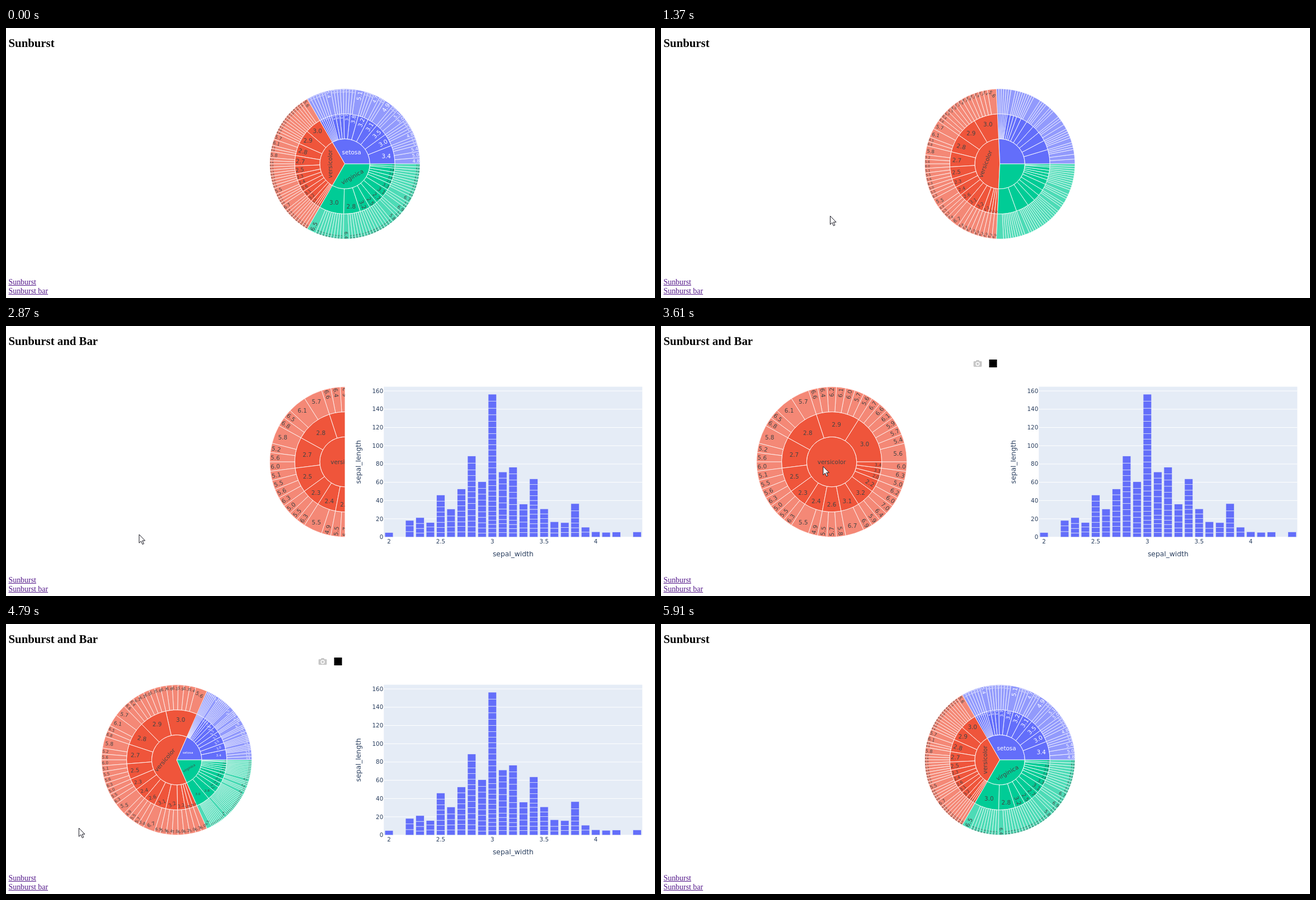
These frames come from a looping animation (1160 px wide and 483 px high, 6700 ms). An HTML page with a canvas:

```html
<!DOCTYPE html>
<html lang="en">
<head>
<meta charset="utf-8">
<title>Sunburst</title>
<style>
  html, body { margin: 0; width: 100%; height: 100%; overflow: hidden; background: #fff; }
  h2, a { position: absolute; left: 4.5px; margin: 0; white-space: nowrap; font-family: "Liberation Serif", serif; }
  h2 { top: 15px; font-size: 20.8px; line-height: 24px; color: #000; }
  a { font-size: 13.9px; line-height: 16px; color: #551a8b; text-decoration: underline; }
  canvas { position: absolute; left: 0; top: 0; width: 1160px; height: 483px; }
</style>
</head>
<body>
<h2 id="heading">Sunburst</h2>
<a style="top:447px">Sunburst</a>
<a style="top:463px">Sunburst bar</a>
<canvas id="stage"></canvas>
<script>
const LOOP = 6700;
const ZOOM_IN = 1192, ZOOM_OUT = 4358, ZOOM_TIME = 785;
const PAGE_IN = 2520, RELAYOUT = 2950, BAR_HIDE = 5280, PAGE_OUT = 5700;
const R = 134.3, CY = 243.1, LINE = 0.87;
const FONT = '"DejaVu Sans", Verdana, sans-serif';
const LABEL_SIZE = 10.4, LABEL_HEIGHT = 12.6, PAD = 2.6;
const RAD = Math.PI / 180;

// Iris measurements: each group is a sepal width followed by its sepal lengths (*n = repeated).
const species = [
  { name: 'setosa', fill: '#636efa', leaf: '#929afc', ink: '#fff', rows:
    '3.4 4.8*2 5.0*2 5.4*2 4.6 5.1 5.2, 3.0 4.8*2 4.3 4.4 4.9 5.0, 3.5 5.0*2 5.1*2 5.2 5.5, ' +
    '3.1 4.9*3 4.6 4.8, 3.2 4.7*2 4.4 4.6 5.0, 3.8 5.1*3 5.7, 3.7 5.1 5.3 5.4, 3.3 5.0 5.1, ' +
    '3.6 4.6 5.0, 3.9 5.4*2, 2.3 4.5, 2.9 4.4, 4.0 5.8, 4.1 5.2, 4.2 5.5, 4.4 5.7' },
  { name: 'versicolor', fill: '#ef553b', leaf: '#f48876', ink: '#444', rows:
    '3.0 5.6*2 5.4 5.7 5.9 6.1 6.6 6.7, 2.9 5.6 5.7 6.0 6.1 6.2 6.4 6.6, 2.8 5.7*2 6.1*2 6.5 6.8, ' +
    '2.7 5.8*2 5.2 5.6 6.0, 2.5 5.1 5.5 5.6 6.3, 2.3 5.0 5.5 6.3, 2.4 5.5*2 4.9, 2.6 5.5 5.7 5.8, ' +
    '3.1 6.7*2 6.9, 3.2 5.9 6.4 7.0, 2.2 6.0 6.2, 2.0 5.0, 3.3 6.3, 3.4 6.0' },
  { name: 'virginica', fill: '#00cc96', leaf: '#4ddbb6', ink: '#444', rows:
    '3.0 6.5*3 5.9 6.0 6.1 6.7 6.8 7.1 7.2 7.6 7.7, 2.8 6.4*2 5.6 5.8 6.2 6.3 7.4 7.7, ' +
    '3.2 6.4 6.5 6.8 6.9 7.2, 2.5 4.9 5.7 6.3 6.7, 2.7 5.8*2 6.3 6.4, 3.1 6.9*2 6.4 6.7, ' +
    '3.3 6.7*2 6.3, 2.6 6.1 7.7, 2.9 6.3 7.3, 3.4 6.2 6.3, 3.8 7.7 7.9, 2.2 6.0, 3.6 7.2' },
];

const canvas = document.getElementById('stage');
const heading = document.getElementById('heading');
const ctx = canvas.getContext('2d');
const ratio = window.devicePixelRatio || 1;
canvas.width = 1160 * ratio;
canvas.height = 483 * ratio;

const lerp = (a, b, k) => a + (b - a) * k;
const clamp = (v, lo, hi) => Math.min(hi, Math.max(lo, v));

// Largest label that fits a sector: level, along the radius, or across it.
function fitLabel(width, a0, a1, depth) {
  const half = (a1 - a0) / 2 * RAD, mid = (a0 + a1) / 2, ring = 1 / depth;
  if (a1 - a0 >= 359.99 && depth === 1) return { scale: 1, reach: 0, rotate: 0, mid };
  const outer = R * depth / 3;
  const inscribed = Math.min(1 / (1 + 1 / Math.sin(Math.min(half, Math.PI / 2))), ring / 2);
  const level = { scale: 2 * inscribed * outer / Math.hypot(width, LABEL_HEIGHT), reach: 1 - inscribed, rotate: 0, mid };
  if (level.scale >= 1) return { ...level, scale: 1 };
  const turned = (aspect, side, angle) => {
    const q = aspect + 1 / (2 * Math.tan(half));
    const size = Math.min(1 / (Math.sqrt(q * q + 0.5) + q), ring / (Math.sqrt(aspect * aspect + ring / 2) + aspect));
    return {
      scale: Math.min(1, 2 * size * (outer - 2 * PAD) / side),
      reach: Math.cos(size) - aspect * size,
      rotate: (angle + 720) % 180 - 90,
      mid,
    };
  };
  const radial = turned(width / LABEL_HEIGHT, LABEL_HEIGHT, 90 - mid);
  const across = turned(LABEL_HEIGHT / width, width, 180 - mid);
  return [level, radial, across].reduce((best, f) => f.scale > best.scale ? f : best);
}

const zoomed = a => clamp((a - 120) * 3, 0, 360);
const nodes = [], stacks = {};

function addNode(kind, label, start, count, depth) {
  const a0 = start * 2.4, a1 = (start + count) * 2.4;
  const inside = kind.name === 'versicolor';
  const width = ctx.measureText(label).width;
  const rest = fitLabel(width, a0, a1, depth);
  const near = inside ? fitLabel(width, zoomed(a0), zoomed(a1), depth)
                      : { ...rest, scale: 0, mid: zoomed(a0) };
  nodes.push({ kind, label, a0, a1, depth, inside, rest, near });
}

ctx.font = `${LABEL_SIZE}px ${FONT}`;
species.forEach((kind, i) => {
  let start = i * 50;
  addNode(kind, kind.name, start, 50, 1);
  for (const group of kind.rows.split(', ')) {
    const [width, ...lengths] = group.split(' ');
    const first = start;
    for (const item of lengths) {
      const [length, repeat] = item.split('*');
      const count = +(repeat || 1);
      addNode(kind, length, start, count, 3);
      for (let n = 0; n < count; n++) (stacks[width] ||= []).push(+length);
      start += count;
    }
    addNode(kind, width, first, start - first, 2);
  }
});
nodes.sort((a, b) => a.depth - b.depth);

function sectorPath(cx, a0, a1, depth) {
  const inner = R * (depth - 1) / 3, outer = R * depth / 3;
  ctx.beginPath();
  if (a1 - a0 >= 359.99) {
    ctx.arc(cx, CY, outer, 0, 2 * Math.PI);
    return;
  }
  ctx.arc(cx, CY, outer, -a0 * RAD, -a1 * RAD, true);
  if (inner) ctx.arc(cx, CY, inner, -a1 * RAD, -a0 * RAD);
  else ctx.lineTo(cx, CY);
  ctx.closePath();
}

function drawLabel(node, cx, zoom, leaving) {
  const { rest, near, depth } = node;
  let pull = zoom;
  if (near.reach === 0) pull = leaving ? 1 - Math.cbrt(1 - zoom) : zoom ** 3;
  const scale = lerp(rest.scale, near.scale, zoom);
  if (scale < 0.08) return;
  const reach = lerp(rest.reach, near.reach, pull) * R * depth / 3;
  const angle = lerp(rest.mid, near.mid, zoom) * RAD;
  ctx.save();
  ctx.translate(cx + reach * Math.cos(angle), CY - reach * Math.sin(angle));
  ctx.rotate(lerp(rest.rotate, near.rotate, zoom) * RAD);
  ctx.scale(scale, scale);
  ctx.fillStyle = node.kind.ink;
  ctx.fillText(node.label, 0, 4);
  ctx.restore();
}

function drawSunburst(t, cx, cropped) {
  const leaving = t >= ZOOM_OUT;
  const zoom = leaving ? 1 - clamp((t - ZOOM_OUT) / ZOOM_TIME, 0, 1) : clamp((t - ZOOM_IN) / ZOOM_TIME, 0, 1);
  ctx.save();
  if (cropped) {
    ctx.beginPath();
    ctx.rect(0, 0, 605.6, 483);
    ctx.clip();
  }
  ctx.strokeStyle = '#fff';
  ctx.lineWidth = LINE;
  for (const { kind, a0, a1, depth } of nodes) {
    const b0 = lerp(a0, zoomed(a0), zoom), b1 = lerp(a1, zoomed(a1), zoom);
    if (b1 - b0 < 1e-4) continue;
    sectorPath(cx, b0, b1, depth);
    ctx.fillStyle = depth === 3 ? kind.leaf : kind.fill;
    ctx.fill();
    ctx.globalAlpha = depth === 3 ? 0.85 : 1;
    ctx.stroke();
    ctx.globalAlpha = 1;
  }
  ctx.font = `${LABEL_SIZE}px ${FONT}`;
  ctx.textAlign = 'center';
  for (const node of nodes) {
    if (node.inside || zoom === 0 || leaving) drawLabel(node, cx, zoom, leaving);
  }
  ctx.restore();
}

function drawBars() {
  const left = 675.3, top = 108.6, right = 1137.3, base = 377.6;
  const yScale = (base - top) / 164.63, xScale = (right - left) / 2.5;
  const xAt = v => left + (v - 1.95) * xScale;
  const yAt = v => base - v * yScale;
  ctx.fillStyle = '#e5ecf6';
  ctx.fillRect(left, top, right - left, base - top);
  ctx.font = `${LABEL_SIZE}px ${FONT}`;
  ctx.textAlign = 'right';
  for (let v = 0; v <= 160; v += 20) {
    ctx.fillStyle = '#fff';
    ctx.fillRect(left, yAt(v) - 0.5, right - left, 1);
    ctx.fillStyle = '#2a3f5f';
    ctx.fillText(v, 674.3, yAt(v) + 3.6);
  }
  ctx.strokeStyle = '#e5ecf6';
  ctx.lineWidth = 0.7;
  const barWidth = 0.08 * xScale;
  for (const width in stacks) {
    let sum = 0;
    for (const length of stacks[width]) {
      const box = [xAt(+width) - barWidth / 2, yAt(sum + length), barWidth, length * yScale];
      ctx.fillStyle = '#636efa';
      ctx.fillRect(...box);
      ctx.strokeRect(...box);
      sum += length;
    }
  }
  ctx.fillStyle = '#2a3f5f';
  ctx.textAlign = 'center';
  for (let v = 2; v <= 4; v += 0.5) ctx.fillText(v, xAt(v), 389);
  ctx.font = `12.3px ${FONT}`;
  ctx.fillText('sepal_width', 906.3, 412.3);
  ctx.save();
  ctx.translate(633.6, 243.2);
  ctx.rotate(-Math.PI / 2);
  ctx.fillText('sepal_length', 0, 0);
  ctx.restore();
}

function drawToolbar() {
  ctx.fillStyle = '#c7c7c7';
  ctx.fill(new Path2D('M560 63h2.6l1.2-2h4.4l1.2 2h2.6q1.4 0 1.4 1.4v7.2q0 1.4-1.4 1.4h-12q-1.4 0-1.4-1.4v-7.2q0-1.4 1.4-1.4z'));
  ctx.strokeStyle = '#fff';
  ctx.lineWidth = 1.5;
  ctx.beginPath();
  ctx.arc(566, 67.8, 2.9, 0, 2 * Math.PI);
  ctx.stroke();
  ctx.fillStyle = '#000';
  ctx.fillRect(586.5, 60, 14, 14);
}

// time, x, y of the pointer tip
const pointerPath = [
  [260, 766, 442], [600, 640, 300], [880, 576, 236], [1170, 570, 238], [1370, 303, 336],
  [1580, 186, 386], [1720, 103, 431], [1900, 68, 459], [2190, 59, 465], [2450, 59, 465],
  [2870, 238, 373], [3140, 226, 366], [3760, 310, 215], [4100, 284, 254], [4350, 284, 254],
  [4440, 277.5, 264], [4930, 72, 405], [5140, 53.5, 441], [5490, 46, 453], [5910, 46, 453],
];
const arrow = new Path2D('M0 0V15.2L3.5 11.9L6 17.6L8.4 16.5L5.9 11H10.6Z');

function drawPointer(t) {
  const next = pointerPath.findIndex(p => p[0] > t);
  if (next < 1) return;
  const [t0, x0, y0] = pointerPath[next - 1], [t1, x1, y1] = pointerPath[next];
  const k = (t - t0) / (t1 - t0);
  ctx.save();
  ctx.translate(lerp(x0, x1, k), lerp(y0, y1, k));
  ctx.fillStyle = '#fff';
  ctx.strokeStyle = '#15151f';
  ctx.lineWidth = 1;
  ctx.fill(arrow);
  ctx.stroke(arrow);
  ctx.restore();
}

function draw(now) {
  const t = now % LOOP;
  const barPage = t >= PAGE_IN && t < PAGE_OUT;
  const moved = barPage && t >= RELAYOUT;
  const title = barPage ? 'Sunburst and Bar' : 'Sunburst';
  if (heading.textContent !== title) heading.textContent = title;
  ctx.setTransform(ratio, 0, 0, ratio, 0, 0);
  ctx.clearRect(0, 0, 1160, 483);
  drawSunburst(t, moved ? 305.1 : 605.6, barPage && !moved);
  if (barPage) drawBars();
  if (moved && t < BAR_HIDE) drawToolbar();
  drawPointer(t);
}

const started = performance.now();
function tick() {
  draw(performance.now() - started);
  requestAnimationFrame(tick);
}
tick();
</script>
</body>
</html>
```
